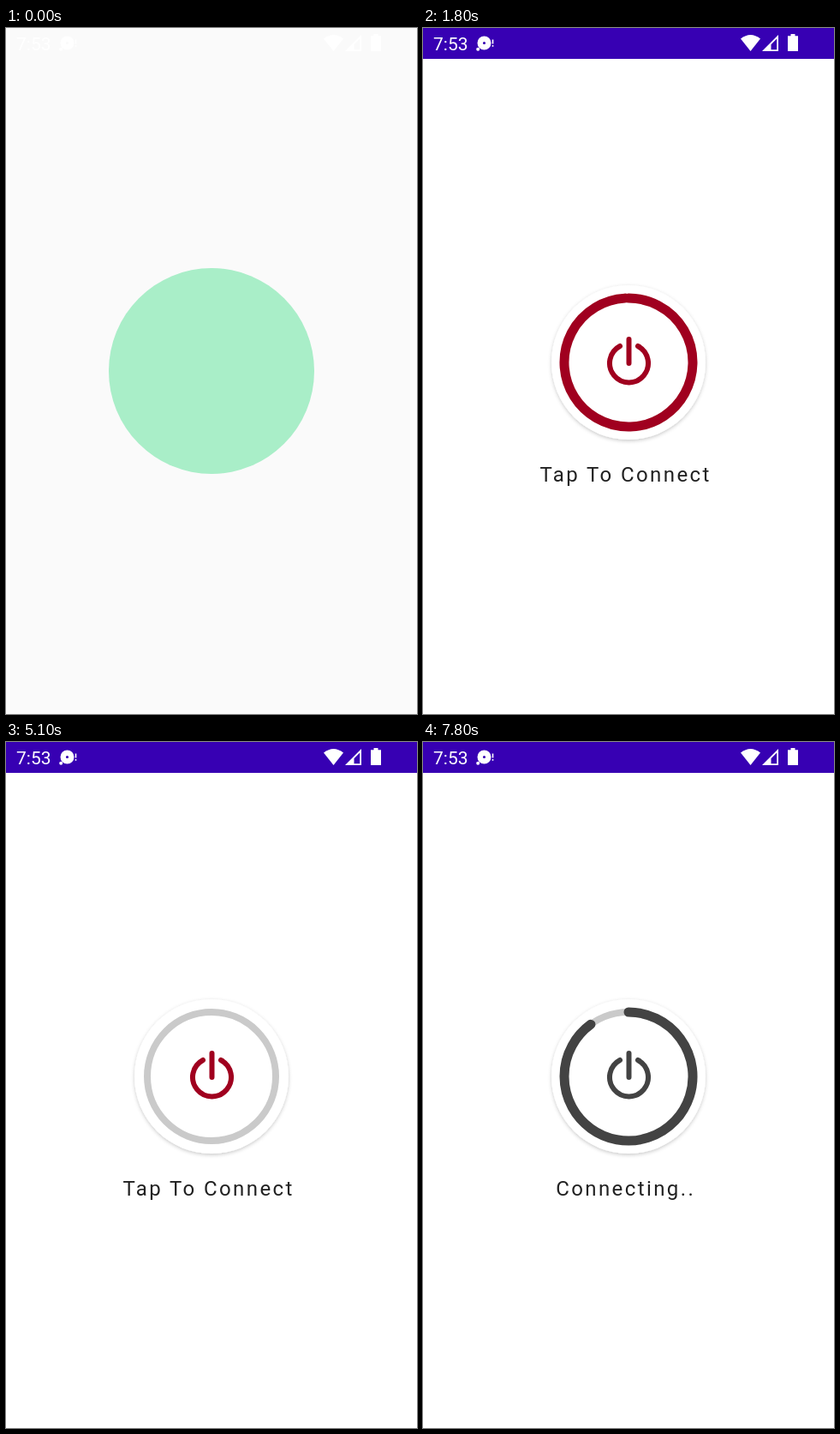
Animation, 480 px wide and 800 px high, one loop 8 s. Source, as an HTML page:

```html
<!DOCTYPE html>
<html lang="en">
<head>
<meta charset="utf-8">
<title>Connect button</title>
<style>
html, body { margin: 0; width: 100%; height: 100%; overflow: hidden; background: #fff; }
svg { display: block; width: 100vw; height: 100vh; }
text { font-family: Roboto, sans-serif; }
</style>
</head>
<body>
<svg viewBox="0 0 480 800">
  <defs>
    <filter id="shadow" x="-20%" y="-20%" width="140%" height="140%">
      <feDropShadow dx="0" dy="1.5" stdDeviation="2" flood-color="#000" flood-opacity=".22"/>
    </filter>
  </defs>
  <rect width="480" height="800" fill="#fff"/>
  <rect width="480" height="36" fill="#3700b3"/>

  <circle cx="240" cy="390" r="90" fill="#fff" filter="url(#shadow)"/>
  <g fill="none" stroke-linecap="round">
    <circle cx="240" cy="390" r="75" stroke="#cacaca" stroke-width="8"/>
    <path id="arc" stroke-width="11"/>
    <path id="power" stroke-width="6" d="M240.5 363V391M230 371A22.5 22.5 0 1 0 251 371"/>
  </g>
  <text id="label" y="529" font-size="24" letter-spacing="2.4" fill="#212121"></text>

  <g id="splash">
    <rect width="480" height="800" fill="#fafafa"/>
    <circle id="logo" cx="240" cy="400" r="120" fill="#3ddc84"/>
  </g>

  <g fill="#fff">
    <text x="12" y="26" font-size="21">7:53</text>
    <path fill-rule="evenodd" d="M63.5 17.5a8 8 0 1 1 16 0a8 8 0 1 1-16 0ZM69.9 17.5a1.6 1.6 0 1 0 3.2 0a1.6 1.6 0 1 0-3.2 0Z"/>
    <circle cx="64.2" cy="24.8" r="2"/>
    <path d="M80.7 13.5h1.6v5h-1.6zM80.7 20h1.6v1.7h-1.6z"/>
    <path d="M382.5 27L371 12.5Q382.5 3.5 394 12.5Z"/>
    <path fill-rule="evenodd" d="M396 27L415 8V27ZM406.5 25.2H413.2V12.6L406.5 19.2Z"/>
    <path d="M426 9.2H429.5V7H434.5V9.2H438V27H426Z"/>
  </g>
</svg>
<script>
const LOOP = 8000;
const RED = [160, 0, 31], GRAY = [67, 67, 67];
const $ = id => document.getElementById(id);
const arc = $('arc'), power = $('power'), label = $('label'), splash = $('splash'), logo = $('logo');

const ramp = (t, start, length) => Math.min(1, Math.max(0, (t - start) / length));
const ease = (t, start, length) => (1 - Math.cos(Math.PI * ramp(t, start, length))) / 2;

function arcPath(part) {
  if (part < 0.002) return '';
  const a = Math.min(part, 0.9999) * 2 * Math.PI;
  const x = 240 + 75 * Math.sin(a), y = 390 - 75 * Math.cos(a);
  return `M240 315A75 75 0 ${part > 0.5 ? 1 : 0} 1 ${x.toFixed(3)} ${y.toFixed(3)}`;
}

function draw(t) {
  const connect = ease(t, 5150, 1200);
  const part = ease(t, 392, 1500) - ease(t, 1892, 1000)
    + 0.85 * connect + 0.05 * ease(t, 6600, 1200);
  const color = `rgb(${RED.map((c, i) => Math.round(c + (GRAY[i] - c) * connect))})`;
  arc.setAttribute('d', arcPath(part));
  arc.setAttribute('stroke', color);
  power.setAttribute('stroke', color);

  const waiting = t < 5200;
  label.textContent = waiting ? 'Tap To Connect' : 'Connecting..';
  label.setAttribute('x', waiting ? 136.4 : 155.2);

  splash.setAttribute('opacity', 1 - ramp(t, 100, 250));
  logo.setAttribute('opacity', 0.43 * (1 - ramp(t, 30, 120)));
}

const begin = performance.now();
function tick() {
  draw((performance.now() - begin) % LOOP);
  requestAnimationFrame(tick);
}
draw(0);
requestAnimationFrame(tick);
</script>
</body>
</html>
```
